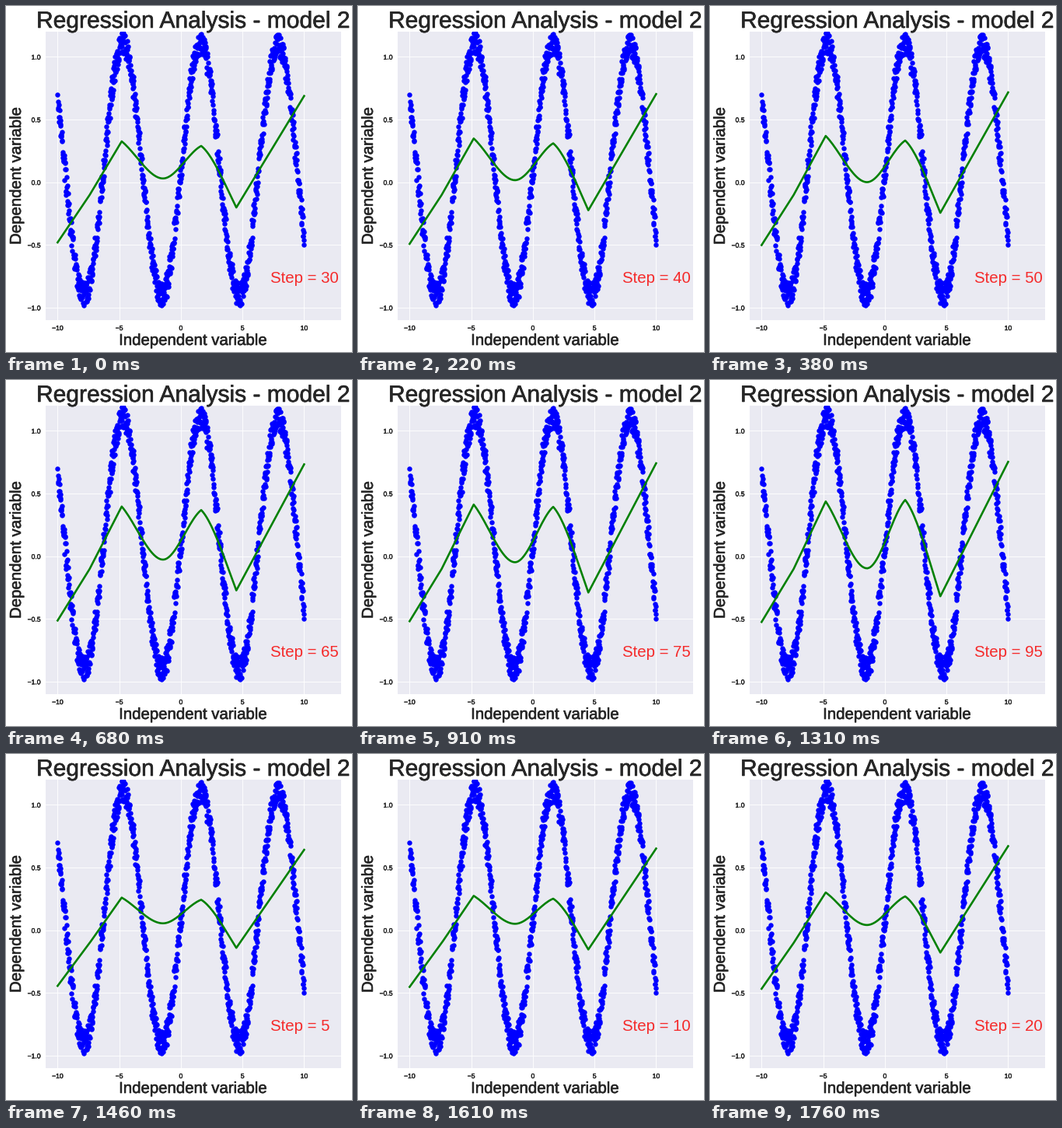
Recreate the animation shown at these times as a matplotlib script. Size 445x445 px, loop 1830 ms.

```python
import numpy as np
import matplotlib.pyplot as plt
from matplotlib.animation import FuncAnimation
from matplotlib.patheffects import withStroke

SIZE = 445
PX = 0.72  # points per pixel at 100 dpi
FRAME_MS = 10
LOOP_MS = 1830
INK = "#262626"

# The step counter follows a steady beat but pauses on a few beats
BEATS = 24
PAUSES = (2, 6, 11, 16, 20)
LEAD_MS = 9

# Turning points of the fit: x, then height as a + b*t + c*t*t of progress t
TURNS = np.array([
    (-10, -.436, -.157, .069),
    (-7.4, -.102, 0, 0),
    (-4.8, .245, .269, -.083),
    (-1.45, .058, -.057, -.085),
    (1.65, .234, .147, .053),
    (4.5, -.128, -.242, .057),
    (10, .630, .198, -.078),
])
# Start and end slope of each stretch, relative to its chord
SLOPES = [(1, 1), (1, 1), (.9, 0), (0, .6), (.45, 1.15), (1, 1)]

plt.rcParams["font.family"] = "Liberation Sans"
fig = plt.figure(figsize=(SIZE / 100, SIZE / 100), dpi=100, facecolor="white")


def bolden(text, width):
    text.set_path_effects([withStroke(linewidth=width * PX, foreground=INK)])


def label(x, y, text, size, **kw):
    """Centred text with its baseline at pixel (x, y) from the top left."""
    t = fig.text(x / SIZE, 1 - y / SIZE, text, fontsize=size * PX, color=INK,
                 ha="center", va="baseline", rotation_mode="anchor", **kw)
    bolden(t, 0.6)


def ease(u, start, end):
    """Cubic from 0 to 1 with the given slopes at its ends."""
    return (start * u * (1 - u) ** 2 + u * u * (3 - 2 * u)
            - end * u * u * (1 - u))


def fit_curve(step):
    t = step / 90
    x = TURNS[:, 0]
    y = TURNS[:, 1:] @ [1, t, t * t]
    u = np.linspace(0, 1, 25)
    xs = [x0 + (x1 - x0) * u for x0, x1 in zip(x, x[1:])]
    ys = [y0 + (y1 - y0) * ease(u, *s) for y0, y1, s in zip(y, y[1:], SLOPES)]
    return np.concatenate(xs), np.concatenate(ys)


left, right, top, bottom = 50.5, 431, 33, 404
ax = fig.add_axes([left / SIZE, 1 - bottom / SIZE,
                   (right - left) / SIZE, (bottom - top) / SIZE],
                  facecolor="#EAEAF2")
ax.set(xlim=(-11, 13), ylim=(-1.1, 1.2),
       xticks=[-10, -5, 0, 5, 10], yticks=[-1, -0.5, 0, 0.5, 1])
ax.spines[:].set_visible(False)
ax.set_axisbelow(True)
ax.grid(color="white", linewidth=0.86 * PX)
ax.tick_params(length=0, pad=6 * PX, labelsize=8.57 * PX, labelcolor=INK)
for tick in ax.get_xticklabels() + ax.get_yticklabels():
    bolden(tick, 0.5)

label(241, 28, "Regression Analysis - model 2", 30)
label(240.5, 436, "Independent variable", 20.4)
label(19, 218.5, "Dependent variable", 20.4, rotation=90)

# Uniform noise from the low 24 bits of each generator word
words = np.random.RandomState(1).randint(0, 2 ** 32, 1000, dtype=np.uint32)
noise = (words % 2 ** 24) / 2 ** 24
x = np.linspace(-10, 10, 1000)
ax.plot(x, np.sin(x) + 0.2 * noise, "o", color="blue",
        markersize=6.4 * PX, markeredgewidth=0)

curve, = ax.plot([], [], color="green", linewidth=2.6 * PX,
                 solid_joinstyle="round")
counter = ax.text(7.25, -0.8, "", color="#F52A2A", fontsize=20.4 * PX)


def update(i):
    beat = int((i * FRAME_MS + LEAD_MS) * BEATS / LOOP_MS)
    moves = beat - sum(p <= beat for p in PAUSES)
    step = (30 + 5 * moves) % 100
    curve.set_data(*fit_curve(step))
    counter.set_text(f"Step = {step}")
    return curve, counter


anim = FuncAnimation(fig, update, frames=LOOP_MS // FRAME_MS,
                     interval=FRAME_MS, repeat=True, repeat_delay=0)
plt.show()
```
